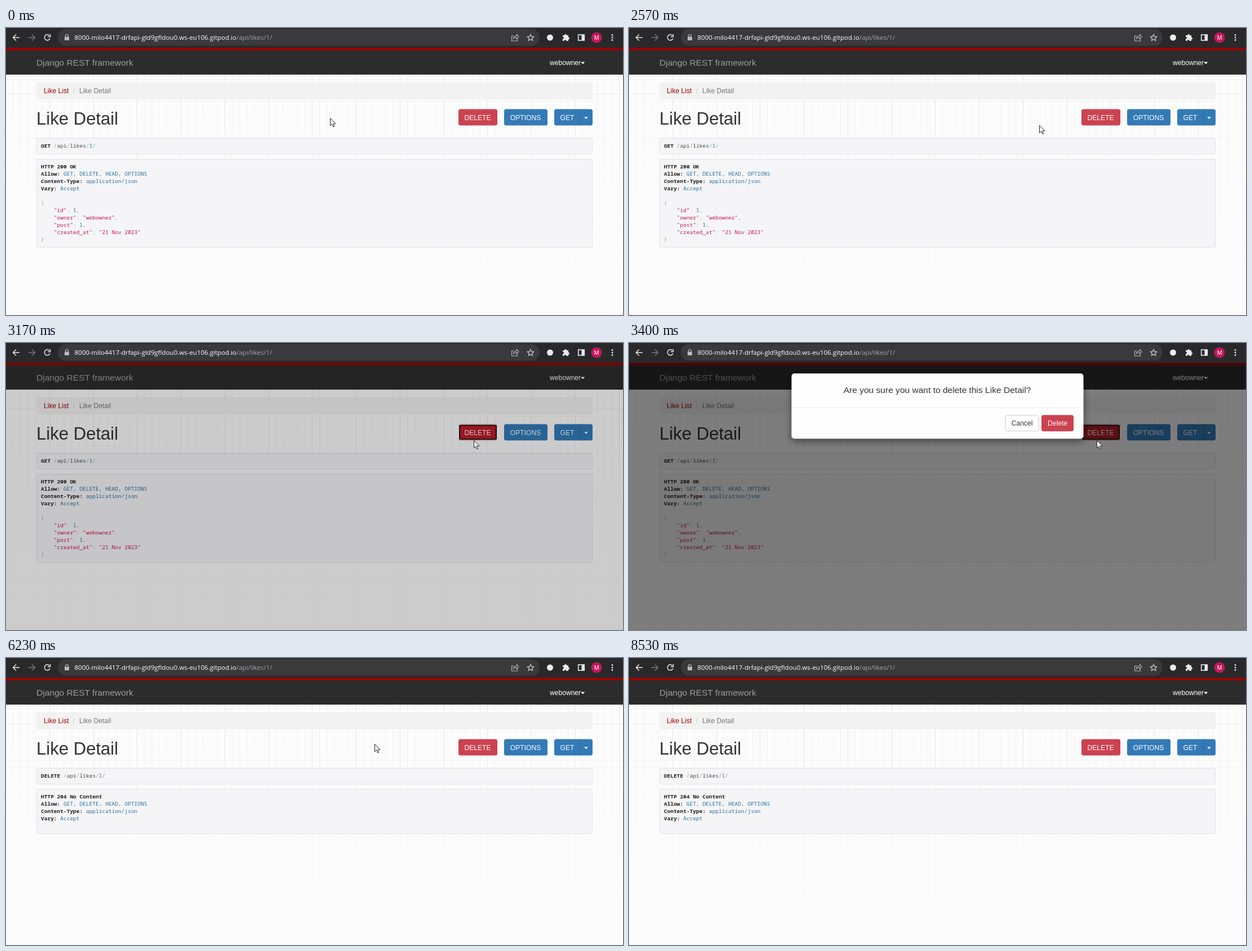
An HTML page for the animation above (8560 ms loop, 1095 by 511 pixels).

```html
<!DOCTYPE html>
<html lang="en">
<head>
<meta charset="utf-8">
<title>Like Detail</title>
<style>
html, body { margin: 0; width: 100%; height: 100%; overflow: hidden; background: #fcfcfc; }
svg, pre, #grid { position: absolute; left: 0; top: 0; }
text { font: 12.1px "Liberation Sans", Arial, sans-serif; }
.mid { text-anchor: middle; }
.url { font: 11.5px "Open Sans", "Noto Sans", sans-serif; }
.big { font-size: 15.55px; }
#grid {
  top: 40px; width: 100%; height: 471px;
  --line: transparent 0 calc(var(--s) - 1px), #d8d8ff66 0 var(--s);
  background:
    repeating-linear-gradient(90deg, transparent 0 76.76px, #dcdce888 0 77.76px),
    repeating-linear-gradient(90deg, transparent 0 11.96px, #e4e4f866 0 12.96px),
    repeating-linear-gradient(transparent 0 76.76px, #e4e4f066 0 77.76px),
    repeating-linear-gradient(transparent 0 11.96px, #eeeee066 0 12.96px);
  -webkit-mask: linear-gradient(#000 20%, #0003 65%, #0002);
  mask: linear-gradient(#000 20%, #0003 65%, #0002);
}
pre {
  left: 54px; width: 987px; margin: 0; padding: 7px; box-sizing: border-box;
  font: 9.52px/12.96px "Noto Sans Mono", "DejaVu Sans Mono", monospace;
  color: #93a1a1; background: #f5f5f7; border: 1px solid #e1e1e8; border-radius: 3.5px;
}
#request { top: 196px; height: 29px; }
#response { top: 233px; }
pre b { color: #222; }
pre i { color: #2a709f; font-style: normal; }
pre u { color: #c8184c; text-decoration: none; }
pre s { color: #48484c; text-decoration: none; }
</style>
</head>
<body>
<div id="grid"></div>
<pre id="request"></pre>
<pre id="response"></pre>
<svg width="1095" height="511" viewBox="0 0 1095 511">
  <defs>
    <filter id="shadow" x="-10%" y="-30%" width="120%" height="170%">
      <feDropShadow dx="0" dy="4.3" stdDeviation="6.5" flood-opacity=".5"/>
    </filter>
  </defs>

  <!-- page -->
  <rect y="35" width="1095" height="48" fill="#2c2c2c"/>
  <rect y="35" width="1095" height="4.6" fill="#a30000"/>
  <text class="big" x="54" y="67" fill="#9d9d9d">Django REST framework</text>
  <text x="965" y="66" fill="#fff">webowner</text>
  <path d="M1020 60.5h7.4l-3.7 3.7z" fill="#fff"/>
  <rect x="54" y="96.500" width="987" height="30.500" rx="3.500" fill="#f2f2f2"/>
  <text x="67" y="116" fill="#a30000">Like List</text>
  <text x="119" y="116" fill="#ccc">/</text>
  <text x="130" y="116" fill="#777">Like Detail</text>
  <text x="54" y="172" fill="#333" style="font-size:31.1px">Like Detail</text>
  <g id="remove">
    <rect x="803" y="144.500" width="69" height="29" rx="3.500"/>
    <rect class="ring" x="805" y="146.500" width="65" height="25" rx="2.500" fill="none" stroke="#111" stroke-width="2"/>
    <rect class="ring" x="803.500" y="145" width="68" height="28" rx="3.500" fill="none" stroke="#fff"/>
    <text class="mid" x="837" y="163.500" fill="#fff">DELETE</text>
  </g>
  <g fill="#337ab7">
    <rect x="884" y="144.500" width="77" height="29" rx="3.500"/>
    <rect x="973" y="144.500" width="68" height="29" rx="3.500"/>
    <path d="M1019.500 144.500v29" stroke="#2e6da4"/>
    <g fill="#fff">
      <text class="mid" x="922" y="163.500">OPTIONS</text>
      <text class="mid" x="996" y="163.500">GET</text>
      <path d="M1026 158.500h7l-3.500 3.500z"/>
    </g>
  </g>

  <!-- dialog -->
  <rect id="shade" y="35" width="1095" height="476"/>
  <g id="modal">
    <rect x="288.500" width="518" height="116" rx="5" fill="#fefefe" filter="url(#shadow)"/>
    <text class="big mid" x="547" y="35" fill="#333">Are you sure you want to delete this Like Detail?</text>
    <path d="M289 61h517" stroke="#e8e8e8"/>
    <rect x="668" y="74.500" width="59" height="28" rx="3.500" fill="#fff" stroke="#ccc"/>
    <text class="mid" x="697.500" y="92.300" fill="#333">Cancel</text>
    <g id="confirm">
      <rect x="732" y="74" width="57" height="29" rx="3.500"/>
      <rect class="ring" x="734" y="76" width="53" height="25" rx="2.500" fill="none" stroke="#111" stroke-width="2"/>
      <rect class="ring" x="732.500" y="74.500" width="56" height="28" rx="3.500" fill="none" stroke="#fff"/>
      <text class="mid" x="760.500" y="92.300" fill="#fff">Delete</text>
    </g>
  </g>

  <!-- browser bar -->
  <rect width="1095" height="35.500" fill="#29292b"/>
  <rect x="92" y="2" width="855" height="29.500" rx="14.750" fill="#3a3a3d"/>
  <g fill="none" stroke="#e8eaed" stroke-width="1.500">
    <path d="M24 17H13M18 11.500L12.500 17l5.500 5.500"/>
    <path d="M40 17h11M46 11.500l5.500 5.500-5.500 5.500" stroke="#77787b"/>
    <path d="M77 13.500a5 5 0 1 0 1 5M78.500 11v4.500H74"/>
    <path d="M105.500 16v-2a2.500 2.500 0 0 1 5 0v2" stroke="#b8babd" stroke-width="1.200"/>
    <path d="M901 14h-3.500v9h10v-3M900.500 19c.5-3.500 3-5 6-5v-2.500l3.500 4-3.500 4V17c-2.500 0-4.500.3-6 2z" stroke="#b8babd" stroke-width="1.100"/>
    <path d="M931 11.500l1.700 3.700 4 .4-3 2.700.9 4-3.600-2.100-3.600 2.100.9-4-3-2.700 4-.4z" stroke="#d0d2d5" stroke-width="1.200"/>
    <rect x="1015.700" y="12" width="10.600" height="10" stroke-width="1.600"/>
  </g>
  <g fill="#e8eaed">
    <rect x="104" y="15.500" width="8" height="6.500" rx="1" fill="#b8babd"/>
    <circle cx="965.500" cy="17" r="5.500"/>
    <path d="M988 13h3a2 2 0 0 1 4 0h3v3.500a2 2 0 0 1 0 4V23h-3.500a2 2 0 0 0-4 0H988v-3.500a2 2 0 0 0 0-4z"/>
    <path d="M1021.500 12h5v10h-5z"/>
    <circle cx="1076" cy="12.500" r="1.400"/><circle cx="1076" cy="17" r="1.400"/><circle cx="1076" cy="21.500" r="1.400"/>
  </g>
  <circle cx="1048" cy="17" r="9.500" fill="#c2185b"/>
  <text class="mid" x="1048" y="20.800" fill="#fff" style="font-size:10.500px">M</text>
  <text class="url" x="121.500" y="21" fill="#fff">8000-milo4417-drfapi-gld9gfldou0.ws-eu106.gitpod.io<tspan fill="#a4a6a9">/api/likes/1/</tspan></text>

  <g id="cursor" fill="#fff" stroke="#222" stroke-linejoin="round">
    <path id="arrow" d="M.5 .5v13.300l3.100-2.900 2.200 5 2-.9-2.200-4.800h4.300z"/>
    <path id="hand" d="M-1.500 1.500a1.500 1.500 0 0 1 3 0v5l5 1.200q1.700.5 1.500 2.300l-1 4.500-1 2.500H0l-4.500-6q-.5-2 1.500-1.500l1.500 1.500z"/>
  </g>
</svg>
<script>
const LOOP = 8560, OPEN = 3113, SLIDE = 3248, FOCUS = 3555, PRESS = 4930, RELOAD = 5130;
const $ = id => document.getElementById(id);
const clamp = v => Math.max(0, Math.min(1, v));
const span = (t, start, length) => clamp((t - start) / length);
const smooth = p => p * p * (3 - 2 * p);

// cursor stops: time, x, y
const path = [
  [0, 575, 160], [1500, 575, 160], [2250, 728, 173], [2580, 728, 173], [2900, 830, 173],
  [3850, 830, 173], [4500, 752, 153], [5350, 752, 153], [6100, 654, 153],
  [7830, 654, 153], [8250, 670, -20], [LOOP, 670, -20]
];

function cursorAt(t) {
  const i = path.findIndex(stop => stop[0] > t);
  const [t0, x0, y0] = path[i - 1], [t1, x1, y1] = path[i];
  const p = smooth((t - t0) / (t1 - t0));
  return [x0 + (x1 - x0) * p, y0 + (y1 - y0) * p];
}

const request = verb => `<b>${verb}</b> /<s>api</s>/<s>likes</s>/<i>1</i>/`;
const head = status => `<b>HTTP ${status}</b>
<b>Allow:</b> <i>GET, DELETE, HEAD, OPTIONS</i>
<b>Content-Type:</b> <i>application/json</i>
<b>Vary:</b> <i>Accept</i>
`;
const body = `
{
    <u>"id"</u>: <i>1</i>,
    <u>"owner"</u>: <u>"webowner"</u>,
    <u>"post"</u>: <i>1</i>,
    <u>"created_at"</u>: <u>"21 Nov 2023"</u>
}`;

let shown;
function setPage(deleted) {
  if (shown === deleted) return;
  shown = deleted;
  $("request").innerHTML = request(deleted ? "DELETE" : "GET");
  $("response").innerHTML = deleted ? head("204 No Content") : head("200 OK") + body;
  $("response").style.height = (deleted ? 80 : 158) + "px";
}

function styleButton(id, pressed, hover) {
  const g = $(id);
  g.setAttribute("fill", pressed ? "#bb1c2b" : hover ? "#b93442" : "#cc4250");
  g.querySelectorAll(".ring").forEach(r => r.style.opacity = +pressed);
}

function draw(t) {
  const [x, y] = cursorAt(t);
  const loaded = t >= RELOAD, dialog = t >= OPEN && !loaded;
  const overRemove = t < OPEN && x > 803;
  const overConfirm = dialog && t > FOCUS && x > 732 && x < 789 && y > 136 && y < 165;
  const slide = 1 - (1 - span(t, SLIDE, 300)) ** 1.8;

  setPage(loaded);
  $("shade").style.opacity = dialog ? span(t, OPEN, 150) / 2 : 0;
  $("modal").style.opacity = dialog ? span(t, SLIDE, 150) : 0;
  $("modal").setAttribute("transform", `translate(0 ${62.3 - 29 * (1 - slide)})`);
  styleButton("remove", t >= OPEN - 60 && t < FOCUS, overRemove);
  styleButton("confirm", dialog && t >= PRESS, overConfirm);

  const hand = overRemove || overConfirm;
  $("cursor").setAttribute("transform", `translate(${Math.round(x)} ${Math.round(y)})`);
  $("hand").style.display = hand ? "" : "none";
  $("arrow").style.display = hand ? "none" : "";
}

function tick() {
  draw(performance.now() % LOOP);
  requestAnimationFrame(tick);
}
tick();
</script>
</body>
</html>
```
